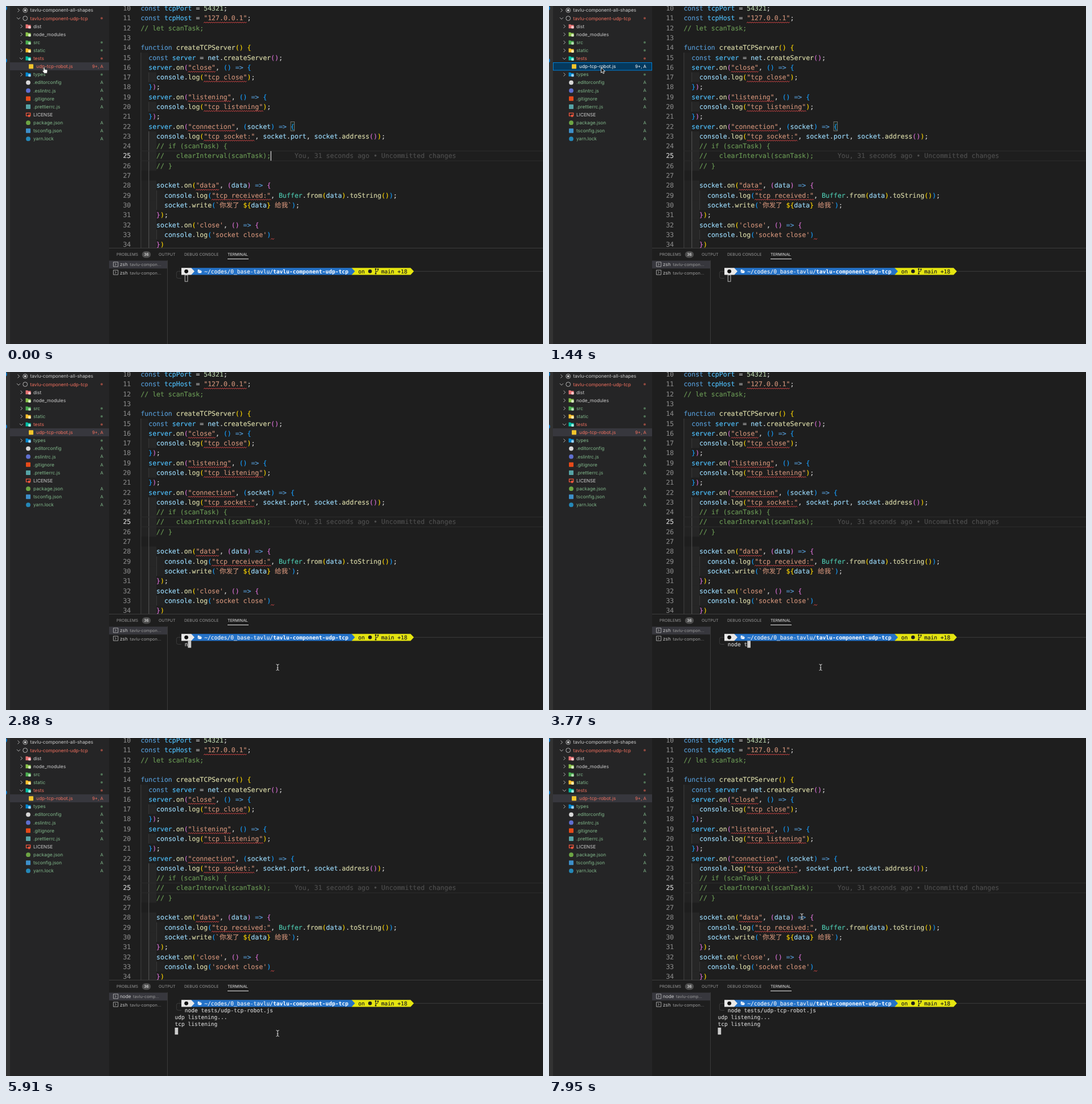
These frames come from a looping animation (943x594 px, 8000 ms). An HTML page:

```html
<!DOCTYPE html>
<html lang="en">
<head>
<meta charset="utf-8">
<title>Editor and terminal</title>
<style>
html, body { margin: 0; width: 100%; height: 100%; overflow: hidden; background: #1e1e1e; }
svg { display: block; }
text { white-space: pre; text-rendering: geometricPrecision; }
.ui { font-family: Inter, "Open Sans", sans-serif; }
.mono { font-family: "DejaVu Sans Mono", "Noto Sans CJK SC", "Noto Sans CJK", monospace; }
</style>
</head>
<body>
<svg id="stage" width="943" height="594" viewBox="0 0 943 594"></svg>
<script>
const LOOP = 8000;
const stage = document.getElementById('stage');
let layer = stage;

function add(tag, attrs, parent = layer) {
  const el = document.createElementNS('http://www.w3.org/2000/svg', tag);
  for (const k in attrs) el.setAttribute(k, attrs[k]);
  parent.appendChild(el);
  return el;
}
const rect = (x, y, w, h, fill, more) => add('rect', { x, y, width: w, height: h, fill, ...more });
const dot = (cx, cy, r, fill, more) => add('circle', { cx, cy, r, fill, ...more });
const path = (d, fill, more) => add('path', { d, fill, ...more });
const line = (d, stroke, width = 1, more) => path(d, 'none', { stroke, 'stroke-width': width, ...more });
function label(cls, x, cy, str, size, fill, more) {
  const el = add('text', { class: cls, x, y: cy + size * 0.35, 'font-size': size, fill, ...more });
  el.textContent = str;
  return el;
}
const ui = (...a) => label('ui', ...a);
// a hairline stroke gives the code its slightly heavier weight
const mono = (x, cy, str, size, fill, more) =>
  label('mono', x, cy, str, size, fill, { stroke: fill, 'stroke-width': .15, ...more });
function group(build) {
  const outer = layer;
  const g = layer = add('g', {});
  build();
  layer = outer;
  return g;
}
const show = (el, on) => el.setAttribute('visibility', on ? 'visible' : 'hidden');

// ---- side bar ----
const RED = '#f2705f', GREEN = '#81b88b', PLAIN = '#cccccc';
const ROW = 14.12, rowY = i => 7.5 + ROW * i;

rect(0, 0, 7, 594, '#333333');
dot(-2, 4, 4, '#0e7fd0');
dot(-2, 96, 4, '#0e7fd0');
rect(7, 0, 174, 594, '#252526');

const FILE_ROW = 7;
const fileBack = rect(7, 99, 174, 14, '#37373d');
const fileFocus = rect(7.5, 99.5, 173, 13.5, '#04395e', { stroke: '#007fd4' });

function chevron(x, y, open) {
  line(open ? `M${x - 3} ${y - 1.4}l3 3 3-3` : `M${x - 1.4} ${y - 3}l3 3-3 3`, '#c5c5c5', .9);
}
function folder(x, y, fill, mark) {
  path(`M${x - 4.5} ${y - 3.6}h3.4l1.2 1.2h4.4v5.8h-9z`, fill);
  rect(x + .2, y - .6, 4.4, 4.4, mark, { rx: 1 });
}
const square = (x, y, fill) => rect(x - 4, y - 4, 8, 8, fill, { rx: .8 });

const roots = [['tavlu-component-all-shapes', PLAIN, false], ['tavlu-component-udp-tcp', RED, true]];
roots.forEach(([name, fill, open], i) => {
  const y = rowY(i);
  chevron(22, y, open);
  dot(33.7, y, 3.9, 'none', { stroke: '#c5c5c5', 'stroke-width': .9 });
  if (!open) dot(33.7, y, 2, '#c5c5c5');
  ui(42.5, y, name, 8.25, fill);
});
dot(168, rowY(1), 2, '#92493f');

const folders = [
  [2, 'dist', PLAIN, '#e57373', '#ffcdd2'],
  [3, 'node_modules', PLAIN, '#8bc34a', '#dcedc8'],
  [4, 'src', GREEN, '#4caf50', '#b9dfba'],
  [5, 'static', GREEN, '#fbc02d', '#fff0b3'],
  [6, 'tests', RED, '#00bfa5', '#a7f0e2'],
  [8, 'types', GREEN, '#0288d1', '#9fd4f2']
];
for (const [i, name, fill, back, mark] of folders) {
  const y = rowY(i);
  chevron(27, y, i === 6);
  folder(39, y, back, mark);
  ui(48, y, name, 8.25, fill);
  if (i > 3) dot(168, y, 2, i === 6 ? '#92493f' : '#517457');
}

square(44, rowY(FILE_ROW), '#f5c52c');
const fileName = ui(53, rowY(FILE_ROW), 'udp-tcp-robot.js', 8.25, RED);
const fileFlag = ui(171, rowY(FILE_ROW), '9+, A', 7.8, RED, { 'text-anchor': 'end' });

const files = [
  ['.editorconfig', '#d8d8d8', 1], ['.eslintrc.js', '#5f6fd0', 1], ['.gitignore', '#e64a19', 0],
  ['.prettierrc.js', '#56a3a5', 0], ['LICENSE', '#f4573d', 0], ['package.json', '#6da544', 1],
  ['tsconfig.json', '#3d8fc9', 0], ['yarn.lock', '#2488b8', 1]
];
files.forEach(([name, mark, round], i) => {
  const y = rowY(9 + i), tracked = name !== 'LICENSE';
  if (round) dot(39, y, 3.9, mark);
  else if (tracked) square(39, y, mark);
  else {
    line(`M35.5 ${y - 3}h7.2v5h-7.2z`, mark, 1.3);
    path(`M39 ${y}h3v4.4l-1.5-1-1.5 1z`, mark);
  }
  ui(48, y, name, 8.25, tracked ? GREEN : PLAIN);
  if (tracked) ui(168.2, y, 'A', 7.8, GREEN, { 'text-anchor': 'middle' });
});

// ---- editor ----
const SIZE = 11.51, PITCH = 6.93, CODE_X = 236.4, LINE = 17.29;
const lineY = n => 4.1 + LINE * (n - 10);
const col = c => CODE_X + c * PITCH;

// "^" plus a colour key starts a token; "S" is a string with a squiggle
const COLORS = {
  k: '#569cd6', v: '#4fc1ff', p: '#9cdcfe', f: '#dcdcaa', s: '#ce9178', S: '#ce9178', n: '#b5cea8',
  c: '#6a9955', t: '#4ec9b0', w: '#d4d4d4', 1: '#ffd700', 2: '#da70d6', 3: '#179fff'
};
const CODE = [
  '^kconst ^vtcpPort ^w= ^n54321^w;',
  '^kconst ^vtcpHost ^w= ^S"127.0.0.1"^w;',
  '^c// let scanTask;',
  '',
  '^kfunction ^fcreateTCPServer^1() {',
  '  ^kconst ^vserver ^w= ^pnet^w.^fcreateServer^2()^w;',
  '  ^vserver^w.^fon^2(^S"close"^w, ^3() ^k=> ^3{',
  '    ^pconsole^w.^flog^1(^S"tcp close"^1)^w;',
  '  ^3}^2)^w;',
  '  ^vserver^w.^fon^2(^S"listening"^w, ^3() ^k=> ^3{',
  '    ^pconsole^w.^flog^1(^S"tcp listening"^1)^w;',
  '  ^3}^2)^w;',
  '  ^vserver^w.^fon^2(^S"connection"^w, ^3(^psocket^3) ^k=> ^3{',
  '    ^pconsole^w.^flog^1(^S"tcp socket:"^w, ^psocket^w.^pport^w, ^psocket^w.^faddress^2()^1)^w;',
  '    ^c// if (scanTask) {',
  '    ^c//   clearInterval(scanTask);',
  '    ^c// }',
  '',
  '    ^psocket^w.^fon^1(^S"data"^w, ^2(^pdata^2) ^k=> ^2{',
  '      ^pconsole^w.^flog^3(^S"tcp received:"^w, ^tBuffer^w.^ffrom^1(^pdata^1)^w.^ftoString^1()^3)^w;',
  '      ^psocket^w.^fwrite^3(^s`你发了 ^1${^pdata^1}^s 给我`^3)^w;',
  '    ^2}^1)^w;',
  "    ^psocket^w.^fon^1(^s'close'^w, ^2() ^k=> ^2{",
  "      ^pconsole^w.^flog^3(^s'socket close'^3)^S ",
  '    ^2}^1)'
];
const widthOf = s => [...s].reduce((w, ch) => w + (ch > '\u2e80' ? SIZE : PITCH), 0);

function squiggle(x, y, w) {
  let d = `M${x} ${y + 1}`;
  for (let i = 1; i * 1.93 <= w + .5; i++) d += `L${x + i * 1.93} ${y + (i % 2 ? -1 : 1)}`;
  line(d, '#f14c4c', .9);
}

// indent cells and guides
CODE.forEach((src, i) => {
  const indent = src.search(/\S/), y = lineY(10 + i) - LINE / 2;
  for (let c = 0; c < indent; c += 2)
    rect(col(c), y, PITCH * 2, LINE, '#fff', { opacity: c % 4 ? .035 : .02 });
});
const guide = (c, from, to, color) =>
  line(`M${col(c) + .5} ${lineY(from) - LINE / 2}V${lineY(to) + LINE / 2}`, color, .8);
guide(0, 15, 34, '#4a4a4a');
[[17, 17], [20, 20]].forEach(([a, b]) => guide(2, a, b, '#404040'));
guide(2, 23, 34, '#666666');
[[29, 30], [33, 33]].forEach(([a, b]) => guide(4, a, b, '#404040'));

rect(CODE_X, lineY(25) - LINE / 2 - .6, 943, 1.2, '#2b2b2b');
rect(CODE_X, lineY(25) + LINE / 2 - .6, 943, 1.2, '#2b2b2b');

const bracketBox = rect(col(38) + .3, lineY(22) - 8.2, 6.4, 16.2, 'rgba(0,100,0,.1)', { stroke: '#888888', 'stroke-width': .8 });

CODE.forEach((src, i) => {
  const n = 10 + i, y = lineY(n);
  mono(219.3, y, n, SIZE, n === 25 ? '#d6d6d6' : '#858585', { 'text-anchor': 'end' });
  const [lead, ...tokens] = src.split('^');
  let x = col(lead.length);
  for (const token of tokens) {
    const key = token[0], str = token.slice(1), w = widthOf(str);
    mono(x, y, str, SIZE, COLORS[key]);
    if (key === 'S') squiggle(x, y + 7.6, w);
    x += w;
  }
});
mono(col(39), lineY(25), 'You, 31 seconds ago • Uncommitted changes', SIZE, '#4f4f4f');
const caret = rect(464.6, lineY(25) - 8.4, 1.3, 16.8, '#d0d0d0');

// ---- panel ----
rect(181, 425, 762, 169, '#1e1e1e');
rect(181, 425, 762, .8, '#454545');
const TABS = [[194, 'PROBLEMS'], [268, 'OUTPUT'], [313, 'DEBUG CONSOLE'], [389, 'TERMINAL']];
TABS.forEach(([x, name], i) => ui(x, 436.8, name, 7.05, i === 3 ? '#e7e7e7' : '#969696'));
rect(389, 444, 37, 1, '#e7e7e7');
rect(238.8, 431, 15.4, 11.4, '#4d4d4d', { rx: 5.7 });
ui(246.5, 436.7, '36', 7, '#ffffff', { 'text-anchor': 'middle' });

rect(181, 447.5, 102, 13.8, '#37373d');
rect(283, 447, .8, 147, '#414141');
function session(y, name, x, desc) {
  ui(200, y, name, 8.25, '#cccccc');
  ui(x, y + .2, desc, 7.4, '#989898');
}
for (const y of [454, 468.2]) {
  line(`M188.6 ${y - 4}h8.2v8h-8.2z`, '#c5c5c5', .8);
  line(`M191.2 ${y - 2}l2.3 2-2.3 2`, '#c5c5c5', .8);
}
session(468.8, 'zsh', 217.5, 'tavlu-compon...');
const idleTab = group(() => session(454.6, 'zsh', 217.5, 'tavlu-compon...'));
const busyTab = group(() => session(454.6, 'node', 223, 'tavlu-comp...'));

// ---- terminal ----
const T_SIZE = 9.55, T_LINE = 12.2;
const tx = c => 296.5 + c * 5.75;
const ty = r => 466.3 + r * T_LINE;
const term = (c, r, str, fill = PLAIN, more) => mono(tx(c), ty(r), str, T_SIZE, fill, more);

line(`M308 466.3h-5.6q-3 0-3 3v6.2q0 3 3 3h5.6`, '#454545', .8);
line(`M${tx(73)} 466.3H943`, '#454545', .8);

function segment(from, to, fill) {
  const y = 460.2, x = tx(to), h = 12.2;
  path(`M${tx(from)} ${y}H${x}l5.75 ${h / 2}-5.75 ${h / 2}H${tx(from)}z`, fill);
}
segment(54, 72, '#e5e510');
segment(5, 54, '#2472c8');
segment(2, 5, '#e9e9e9');
dot(tx(3.5), 466.3, 3.4, '#111111');
path(`M${tx(7)} 463.3h2.4l.9 1h2.6v1.1h-4l-1.1 3.2h-.8z`, '#ffffff');
path(`M${tx(7) + 2.2} 466h5l-1.2 3.3h-5z`, '#ffffff');
term(9, 0, '~/codes/0_base-tavlu/', '#f2f2f2');
term(30, 0, 'tavlu-component-udp-tcp', '#ffffff', { 'font-weight': 700, 'stroke-width': 0 });
term(56, 0, 'on', '#1e1e1e');
dot(tx(59) + 3.5, 466.3, 3.2, '#1e1e1e');
line('M649.2 463.2v6.4M653.2 463.6v1.2q0 2-4 2.6', '#1e1e1e', 1);
for (const [x, y] of [[649.2, 462.4], [649.2, 470.2], [653.2, 462.8]]) dot(x, y, 1.3, '#1e1e1e');
term(63, 0, 'main +18', '#1e1e1e');

const command = term(3, 1, '');
const output = [term(0, 2, 'udp listening...'), term(0, 3, 'tcp listening')];
const block = rect(0, 0, 5.6, 12.2, '#cccccc', { 'stroke-width': .9 });

// ---- tooltip ----
const tip = group(() => {
  rect(54, 121.5, 172, 33, '#000000', { rx: 3, opacity: .2 });
  rect(56, 122, 168, 30, '#c9c9c9', { stroke: '#a8a8a8', 'stroke-width': .6 });
  ['~/codes/0_base-tavlu/tavlu-component-udp-', 'tcp/tests/udp-tcp-robot.js • 28 problems in this', 'file • Index Added']
    .forEach((s, i) => ui(59, 128.2 + i * 8.8, s, 6.9, '#262626'));
});

// ---- mouse ----
const hand = group(() => path(
  'M-1.2 0q1.2-1 2.2 0v3.2l3.8.9q1.3.4 1.1 1.8l-.7 4.3h-5.2l-3-4q0-1.5 1.8-.4z',
  '#ffffff', { stroke: '#222222', 'stroke-width': .7 }));
const arrow = group(() => path('M0 0v9.4l2.2-2 1.5 3.4 1.7-.8-1.5-3.2h3z',
  '#111111', { stroke: '#ffffff', 'stroke-width': .9 }));
const beam = group(() => {
  const d = 'M-2.6-5.3q2.6 0 2.6 1.8 0-1.8 2.6-1.8M0-3.5v7M-2.6 5.3q2.6 0 2.6-1.8 0 1.8 2.6 1.8M-1.3 1h2.6';
  line(d, '#111111', 2);
  line(d, '#e8e8e8', 1);
});

// ---- timeline ----
const MOUSE = [
  [0, 67, 108], [360, 67, 108], [720, 77, 108.5], [860, 78, 108.5], [1080, 91.5, 108], [1480, 91.5, 108],
  [1540, 130, 62], [1610, 225, 44], [1700, 370, 210], [1790, 450, 440], [1890, 477, 519],
  [6690, 477, 519], [6850, 448, 555], [7000, 395, 585], [7160, 320, 572], [7260, 308, 540],
  [7380, 330, 504], [7490, 357, 509], [7790, 357, 509], [7840, 372, 470], [7950, 444, 314], [8000, 444, 314]
];
const FULL = 'node tests/udp-tcp-robot.js ';
const TYPED = [
  [0, 0], [2880, 1], [3060, 2], [3240, 3], [3410, 4], [3530, 5], [3770, 6], [3830, 7],
  [4070, 11], [4550, 12], [4730, 13], [4850, 14], [5090, 28]
];

const stepAt = (steps, t) => steps.filter(s => s[0] <= t).pop();

function mouseAt(t) {
  const i = Math.max(1, MOUSE.findIndex(p => p[0] > t));
  const [t0, x0, y0] = MOUSE[i - 1], [t1, x1, y1] = MOUSE[i];
  const k = (t - t0) / (t1 - t0);
  return [x0 + (x1 - x0) * k, y0 + (y1 - y0) * k];
}

function draw(t) {
  const picked = t >= 1400 && t < 2100, typing = t >= 2100;
  show(fileFocus, picked);
  show(fileBack, !picked);
  fileName.setAttribute('fill', picked ? '#ffffff' : RED);
  fileFlag.setAttribute('fill', picked ? '#ffffff' : RED);
  show(tip, t >= 790 && t < 1380);
  show(caret, t < 360 || (t >= 850 && t < 1350));
  show(bracketBox, t < 1500);

  const count = stepAt(TYPED, t)[1];
  command.textContent = FULL.slice(0, count);
  show(output[0], t >= 5830);
  show(output[1], t >= 5910);
  show(idleTab, t < 5910);
  show(busyTab, t >= 5910);

  const row = t < 5740 ? 1 : t < 5830 ? 2 : t < 5910 ? 3 : 4;
  const inset = typing ? 0 : .5;
  block.setAttribute('x', tx(row === 1 ? 3 + count : 0) + inset);
  block.setAttribute('y', ty(row) - 6.1 + inset);
  block.setAttribute('width', 5.7 - inset * 2);
  block.setAttribute('height', 12.2 - inset * 2);
  block.setAttribute('fill', typing ? '#cccccc' : 'none');
  block.setAttribute('stroke', typing ? 'none' : '#cccccc');

  const [x, y] = mouseAt(t);
  const shape = t <= 380 ? hand : x < 181 && t < 2000 ? arrow : beam;
  for (const m of [hand, arrow, beam]) show(m, m === shape);
  shape.setAttribute('transform', `translate(${x} ${y})`);
}

const start = performance.now();
function tick() {
  draw((performance.now() - start) % LOOP);
  requestAnimationFrame(tick);
}
tick();
</script>
</body>
</html>
```
